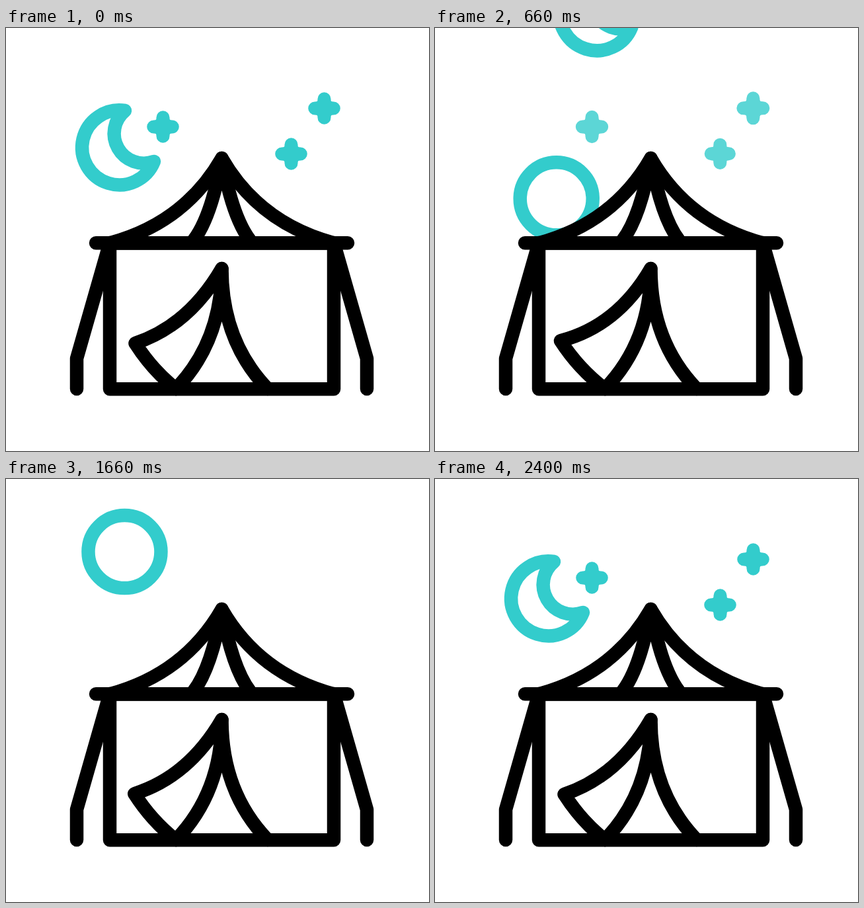
Write an HTML page that moves like this. It is 640x640 px and loops after 2420 ms.

```html
<!DOCTYPE html>
<html lang="en">
<head>
<meta charset="utf-8">
<title>Tent by day and night</title>
<style>
  html, body { margin: 0; height: 100%; overflow: hidden; background: #fff; }
  svg { display: block; width: 100%; height: 100%; }
</style>
</head>
<body>
<svg viewBox="0 0 640 640" fill="none" stroke-width="20.5" stroke-linecap="round" stroke-linejoin="round">
  <g stroke="none">
    <path id="moonSet" d="M172 181Q158.4 18.5 376-144"/>
    <path id="moonRise" d="M359 405Q166 293 172 181"/>
    <path id="sunRise" d="M317 417Q151 288.5 173 160"/>
    <path id="sunSet" d="M173 160Q183.5 12 297-136"/>
  </g>
  <g stroke="#3cc">
    <circle id="sun" r="55"/>
    <path id="moon" d="M8-56A56.5 56.5 0 1 0 52 21A45 45 0 0 1 8-56Z"/>
    <g id="stars" fill="#3cc" stroke-width="20"></g>
  </g>
  <g stroke="#000">
    <path d="M107 546V500L157 325M546 546V500L496 325"/>
    <path fill="#fff" d="M157 325.3H496V546.3H157Z"/>
    <path fill="#fff" d="M326.5 197Q270 295 157 325.3H496Q383 295 326.5 197Z"/>
    <path d="M136 325.3H517M284 321Q311 285 326.5 197Q342 285 369 321"/>
    <path d="M257 546Q326.5 474 326.5 364Q326.5 474 396 546"/>
    <path id="flap"/>
  </g>
</svg>
<script>
const LOOP = 2420, ACTIVE = 2400;
const DAWN = 297, DUSK = 1492;
const RISE = 587, SET = 680;
const $ = id => document.getElementById(id);
const clamp = x => Math.min(1, Math.max(0, x));
const smooth = x => (x = clamp(x), x * x * (3 - 2 * x));
// Eased 0 -> 1 -> 0 swing
const pulse = (t, period) => smooth(1 - Math.abs(2 * (t % period) / period - 1));

// Centre, growth of the arms and drift of the centre at full pulse
const stars = [
  { x: 237.5, y: 149.5, grow: 3.8, dx: 0, dy: .4 },
  { x: 481.5, y: 121.5, grow: 6.5, dx: -1.5, dy: -1.2 },
  { x: 431.5, y: 190.5, grow: -6.6, dx: -2, dy: -2 }
].map(star => {
  const el = document.createElementNS('http://www.w3.org/2000/svg', 'path');
  return { ...star, el: $('stars').appendChild(el) };
});

function place(id, pathId, progress) {
  const path = $(pathId);
  const { x, y } = path.getPointAtLength(path.getTotalLength() * progress);
  $(id).setAttribute('transform', `translate(${x} ${y})`);
}

function draw(t) {
  const evening = t >= DUSK;
  const elapsed = t - (evening ? DUSK : DAWN);
  const rise = smooth(elapsed / RISE), set = smooth(elapsed / SET);
  if (evening) {
    place('moon', 'moonRise', rise);
    place('sun', 'sunSet', set);
  } else {
    place('sun', 'sunRise', rise);
    place('moon', 'moonSet', set);
  }

  const twinkle = pulse(t, 600);
  for (const s of stars) {
    const a = 14.3 + s.grow * twinkle;
    s.el.setAttribute('d', `M0 ${-a}Q0 0 ${a} 0Q0 0 0 ${a}Q0 0 ${-a} 0Q0 0 0 ${-a}Z`);
    s.el.setAttribute('transform', `translate(${s.x + s.dx * twinkle} ${s.y + s.dy * twinkle})`);
  }
  $('stars').setAttribute('opacity', clamp((900 - t) / 300) + clamp((t - 1800) / 300));

  const p = pulse(t, 800);
  $('flap').setAttribute('d', `M326.5 364Q${276.5 - 2.5 * p} ${450 + 4 * p} ${195.5 - 20 * p} ${477 - 13.5 * p}` +
    `Q${221 - 14 * p} ${517 - 6 * p} 257 546`);
}

const start = performance.now();
function frame() {
  draw(Math.min(ACTIVE, (performance.now() - start) % LOOP));
  requestAnimationFrame(frame);
}
frame();
</script>
</body>
</html>
```
